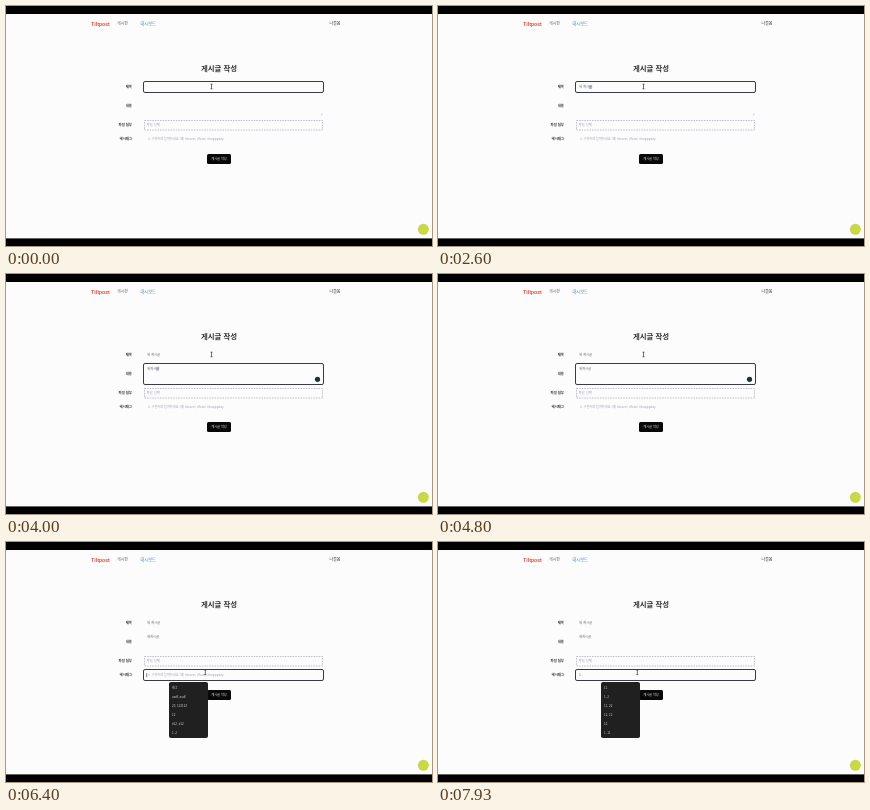
Animation of 426 by 240 pixels, one loop 8 s. Source, as an HTML page:

```html
<!DOCTYPE html>
<html lang="ko">
<head>
<meta charset="utf-8">
<style>
  html, body { margin: 0; width: 100%; height: 100%; overflow: hidden; background: #000; }
  svg { display: block; width: 100%; height: 100%; }
  text { font-family: "Noto Sans CJK KR", "Noto Sans CJK", "Noto Sans", sans-serif; fill: #333; font-size: 3.4px; }
  .label { font-weight: 700; text-anchor: end; }
  .value { fill: #666; font-size: 3.3px; }
  .hint { fill: #a0a0b4; font-size: 3.17px; }
  #menu text { fill: #ddd; font-size: 3px; }
</style>
</head>
<body>
<svg viewBox="0 0 426 240">
  <rect width="426" height="240"/>
  <rect y="8" width="426" height="224.4" fill="#fcfcfd"/>

  <text x="85" y="20" style="font: 500 5.5px Roboto, sans-serif; fill: #e0472c">Tiltpost</text>
  <text x="111" y="19.2" style="font-size: 4px; fill: #667">게시판</text>
  <text x="134.5" y="19.2" style="font-size: 4.2px; fill: #4f86b5">대시보드</text>
  <text x="323.5" y="19.2" style="font-size: 4px">나들봄</text>

  <text x="213" y="64.8" text-anchor="middle" style="font-size: 7.4px; font-weight: 700">게시글 작성</text>
  <text class="label" x="126" y="82.2">제목</text>
  <text class="label" x="126" y="101.2">내용</text>
  <text class="label" x="126" y="120.2">파일 첨부</text>
  <text class="label" x="126" y="134.2">해시태그</text>

  <path id="grip" d="M314.8 109.2l1.6-1.6M315.9 109.2l.5-.5" stroke="#888" stroke-width=".4"/>
  <rect x="138.5" y="114.5" width="178" height="9.5" fill="none" stroke="#b4b0cc" stroke-width=".8" stroke-dasharray="1.6 1"/>
  <text class="hint" x="140.5" y="120.2" style="font-size: 3.4px">파일 선택</text>

  <rect id="focus" x="137.5" width="180" rx="1.5" fill="#fcfcfd" stroke="#3a3b4a"/>
  <text id="tagHint" class="hint" x="142" y="134.2">#, 구분하여 입력하세요. 예) #travel, #food, #happyday</text>
  <g id="fields"></g>
  <circle id="badge" cx="311.5" cy="105.3" r="2.6" fill="#24303a"/>
  <rect id="caret" width=".6" height="4" fill="#333"/>

  <rect x="201" y="148" width="24" height="10" rx="1.5" fill="#080808"/>
  <text x="213" y="154.1" text-anchor="middle" style="font-size: 3.2px; fill: #eee">게시글 작성</text>

  <g id="menu">
    <rect x="163" y="140" width="39" height="56" rx="2" fill="#202020"/>
  </g>

  <circle cx="417.3" cy="223.3" r="5.5" fill="#c9d943"/>
  <path id="ibeam" d="M-1 -2.3H1M0 -2.3V2.3M-1 2.3H1" stroke="#333" stroke-width=".7" fill="none"/>
  <path id="arrow" d="M-1 -2V2L.1 1L.8 2.6L1.5 2.2L.8 .8H2Z" fill="#fff" stroke="#666" stroke-width=".4"/>
</svg>
<script>
const LOOP = 8000;
const BODY_FOCUS = 2950, TAG_FOCUS = 6000, MENU_OPEN = 6100, TAG_TYPED = 7300;
const $ = id => document.getElementById(id);
const make = (tag, attrs, parent) => {
  const node = document.createElementNS("http://www.w3.org/2000/svg", tag);
  for (const key in attrs) node.setAttribute(key, attrs[key]);
  return parent.appendChild(node);
};
const show = (node, visible) => node.setAttribute("visibility", visible ? "visible" : "hidden");
const ease = (t, from, to) => {
  const p = Math.min(1, Math.max(0, (t - from) / (to - from)));
  return p * p * (3 - 2 * p);
};

// Each key string is one keystroke of Hangul composition.
const fields = [
  { x: 141, y: 82.2, top: 75.5, height: 11, start: 1500, end: 2560, done: BODY_FOCUS,
    keys: ["ㅅ", "새", "새 ", "새 ㄱ", "새 게", "새 겟", "새 게시", "새 게식", "새 게시그", "새 게시글"] },
  { x: 141, y: 95.8, top: 89.5, height: 21, start: 3200, end: 3960, done: 4300,
    keys: ["ㅅ", "새", "색", "새게", "새겟", "새게시", "새게식", "새게시그", "새게시글"] },
  { x: 141, y: 134.4, top: 127.5, height: 11, start: TAG_TYPED, end: TAG_TYPED, done: TAG_TYPED, keys: ["1"] }
].map(f => ({
  ...f,
  mark: make("rect", { y: f.y - 3.2, width: 3.3, height: 4, fill: "#c5cbe2" }, $("fields")),
  text: make("text", { x: f.x, y: f.y, class: "value" }, $("fields"))
}));

const suggestions = [
  ["태그", "asdf, asdf", "23, 123123", "12", "#12, #12", "1, 2"],
  ["11", "1, 2", "11, 22", "12, 12", "12", "1, 11"]
];
const rows = suggestions[0].map((_, i) => make("text", { x: 166, y: 147.2 + i * 9 }, $("menu")));

function typeField({ keys, start, end, done, text, mark, x }, t) {
  const progress = end > start ? Math.min(1, (t - start) / (end - start)) : 1;
  const value = t < start ? "" : keys[Math.floor(progress * (keys.length - 1))];
  text.textContent = value;
  const width = value ? text.getComputedTextLength() : 0;
  show(mark, value && !value.endsWith(" ") && t < done);
  mark.setAttribute("x", x + width - 3.2);
  return width;
}

function draw(t) {
  const active = t < BODY_FOCUS ? 0 : t < TAG_FOCUS ? 1 : 2;
  const field = fields[active];
  $("focus").setAttribute("y", field.top);
  $("focus").setAttribute("height", field.height);

  const widths = fields.map(f => typeField(f, t));
  const composing = t >= field.start && t < field.done;
  const blinkOn = t % 1000 >= 100 && t % 1000 < 600;
  $("caret").setAttribute("x", field.x - .5 + widths[active]);
  $("caret").setAttribute("y", field.y - 3.3);
  show($("caret"), !composing && blinkOn);

  show($("badge"), active === 1);
  show($("grip"), active === 0);
  show($("tagHint"), t < TAG_TYPED);

  show($("menu"), t >= MENU_OPEN);
  rows.forEach((row, i) => row.textContent = suggestions[t < TAG_TYPED ? 0 : 1][i]);

  const move = ease(t, 4800, 5550), settle = ease(t, 5650, 5950);
  const x = 205.5 - 3.5 * move - 2.7 * settle;
  const y = 80.5 + 48.8 * move + settle;
  const pointing = y > 111 && t < 5750;
  for (const id of ["ibeam", "arrow"]) $(id).setAttribute("transform", `translate(${x} ${y})`);
  show($("ibeam"), !pointing);
  show($("arrow"), pointing);
}

function frame() {
  draw(performance.now() % LOOP);
  requestAnimationFrame(frame);
}
frame();
</script>
</body>
</html>
```
